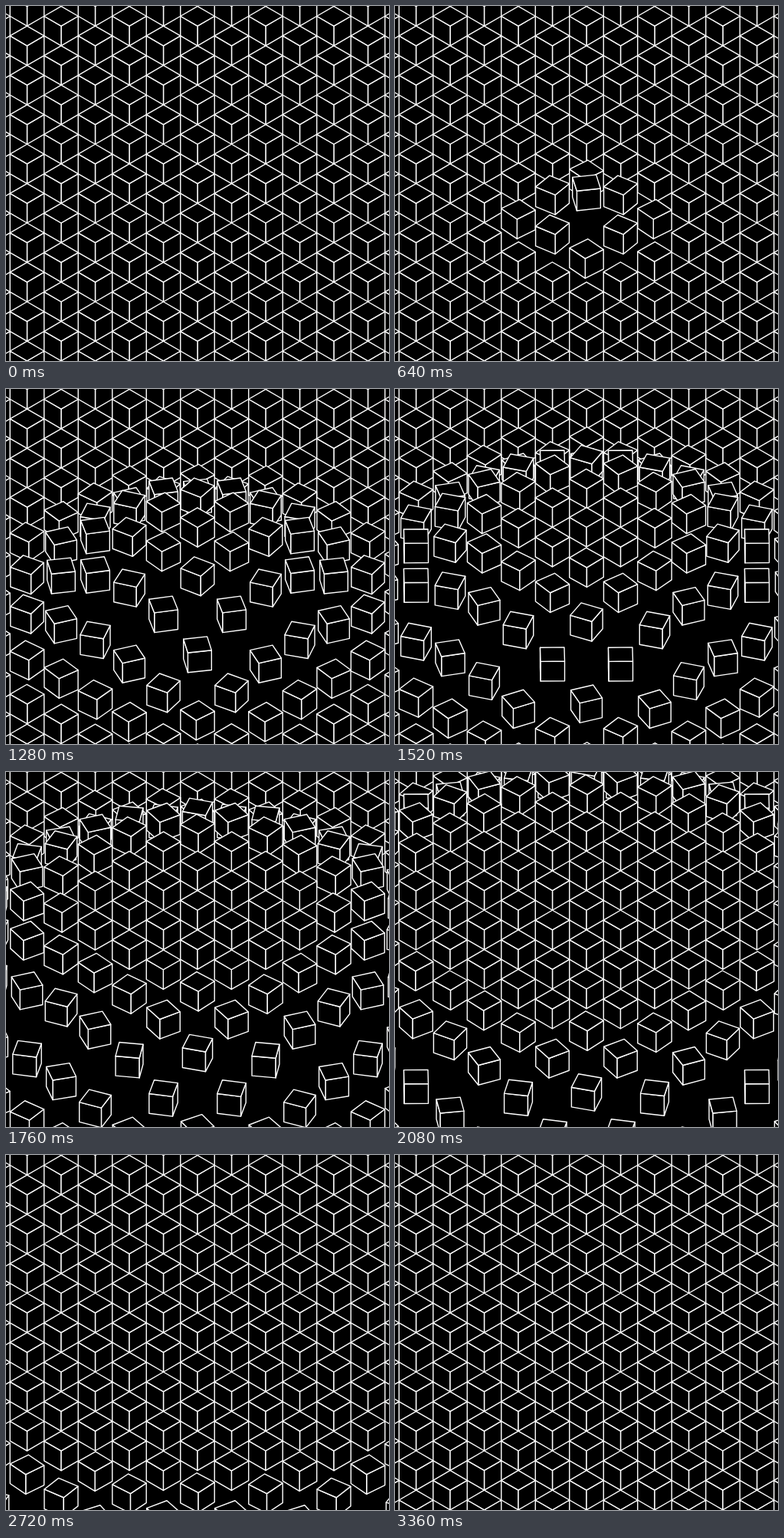
These frames come from a looping animation (500x463 px, 3.6 s). An HTML page with a canvas:

```html
<!DOCTYPE html>
<html lang="en">
<head>
<meta charset="utf-8">
<title>Cube wave</title>
<style>
  html, body { margin: 0; width: 100%; height: 100%; overflow: hidden; background: #000; }
  canvas { display: block; }
</style>
</head>
<body>
<canvas id="stage" width="500" height="463"></canvas>
<script>
const ctx = document.getElementById('stage').getContext('2d');

const LOOP = 3600;
const RISE_TIME = 1400;
const DELAY = 160 * Math.SQRT2;   // per grid step away from the centre
const COL = 44.5;
const ROW = COL / Math.sqrt(3);
const RISE = 4 * ROW;
const CENTER = { x: 250, y: 283 };
const RADIUS = COL / 2;           // half diagonal of the top face
const TILT = Math.sqrt(1 / 3);    // isometric foreshortening of the ground
const HALF_HEIGHT = ROW / 2;

// Back to front; odd columns turn the other way
const cubes = [];
for (let row = -13; row <= 14; row++) {
  for (let col = -6; col <= 6; col++) {
    if ((row + col) % 2 === 0) {
      cubes.push({
        x: CENTER.x + col * COL,
        y: CENTER.y + row * ROW,
        spin: col % 2 ? -1 : 1,
        delay: Math.hypot(row, col) / Math.SQRT2 * DELAY
      });
    }
  }
}

const clamp01 = v => Math.min(1, Math.max(0, v));
const easeInOut = u => u < 0.5 ? 4 * u ** 3 : 1 - 4 * (1 - u) ** 3;

function drawFace(points) {
  ctx.beginPath();
  points.forEach(p => ctx.lineTo(p[0], p[1]));
  ctx.closePath();
  ctx.fill();
  ctx.stroke();
}

function drawCube(x, y, turn) {
  const ring = offset => [0, 1, 2, 3].map(i => {
    const angle = i * Math.PI / 2 + turn;
    return [x + RADIUS * Math.cos(angle), y + RADIUS * TILT * Math.sin(angle) + offset];
  });
  const top = ring(-HALF_HEIGHT), bottom = ring(HALF_HEIGHT);
  for (let i = 0; i < 4; i++) {
    const j = (i + 1) % 4;
    const facesViewer = top[i][0] - top[j][0] > 0.01;
    if (facesViewer) drawFace([top[j], top[i], bottom[i], bottom[j]]);
  }
  drawFace(top);
}

function draw(time) {
  ctx.fillStyle = '#000';
  ctx.fillRect(0, 0, 500, 463);
  ctx.strokeStyle = '#fff';
  ctx.lineWidth = 1.4;
  ctx.lineJoin = 'round';
  for (const cube of cubes) {
    const progress = easeInOut(clamp01((time - cube.delay) / RISE_TIME));
    drawCube(cube.x, cube.y - RISE * progress, cube.spin * progress * Math.PI / 2);
  }
}

const start = performance.now();
function tick() {
  draw((performance.now() - start) % LOOP);
  requestAnimationFrame(tick);
}
tick();
</script>
</body>
</html>
```
